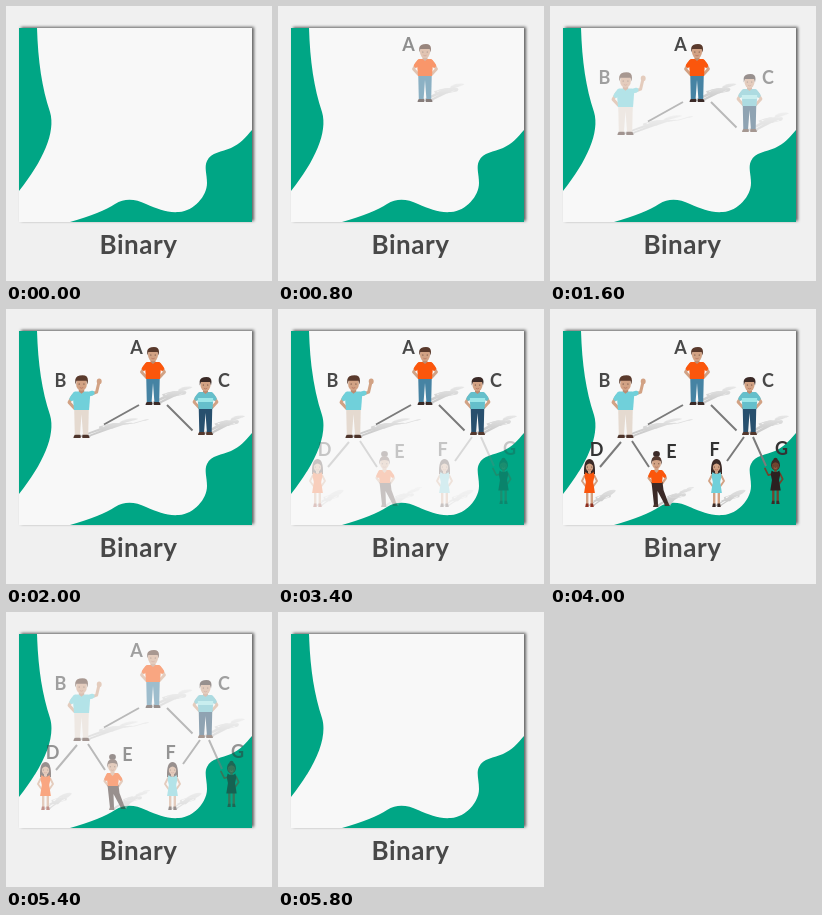
Animation, 266 px wide and 275 px high, one loop 6.4 s. Source, as an HTML page:

```html
<!DOCTYPE html>
<html lang="en">
<head>
<meta charset="utf-8">
<title>Binary tree</title>
<style>
html, body { margin: 0; width: 100%; height: 100%; overflow: hidden; background: #f0f0f0; }
svg { display: block; width: 266px; height: 275px; }
text { font-family: Lato, "Open Sans", sans-serif; font-weight: 700; fill: #484848; text-anchor: middle; }
</style>
</head>
<body>
<svg id="stage" viewBox="0 0 266 275"></svg>
<script>
const SKIN = '#d2a284', HAIR = '#5a3a2c', DARK = '#3b2a27', ORANGE = '#fb560c', CYAN = '#70d0da';

// A part is a filled shape, or a stroked line when it has a width.
const part = (color, d, width) => ({ color, d, width });

const draw = (p, color = p.color) => p.width
  ? `<path d="${p.d}" fill="none" stroke="${color}" stroke-width="${p.width}" stroke-linejoin="round" stroke-linecap="round"/>`
  : `<path d="${p.d}" fill="${color}"/>`;

const oval = (x, y, rx, ry) =>
  `M${x - rx} ${y}a${rx} ${ry} 0 1 0 ${2 * rx} 0a${rx} ${ry} 0 1 0 ${-2 * rx} 0Z`;

const eyes = y => part('#5b4037', `M-2.2 ${y}h.1M2.2 ${y}h.1`, 1.1);
const mouth = y => part('#b5705c', `M-1.3 ${y}Q0 ${y + 1} 1.3 ${y}`, .7);

function man({ shirt, pants, shoes, hair = HAIR, wave, stripe }) {
  const right = wave
    ? [part(SKIN, 'M7 -40L14 -42.5L16 -51', 2.8), part(SKIN, oval(16.4, -52.5, 2.3, 2.7)),
       part(shirt, 'M6 -40.5L10 -41.5', 4.4)]
    : [part(SKIN, 'M8 -39L11.5 -33L6.5 -27.5', 2.8), part(shirt, 'M6 -40.5L9 -36.5', 4.4)];
  return [
    part(SKIN, 'M-8 -39L-11.5 -33L-6.5 -27.5', 2.8),
    part(shirt, 'M-6 -40.5L-9 -36.5', 4.4),
    ...right,
    part(shoes, 'M-7.5 0Q-7 -4 -3.5 -4T-.8 0ZM7.5 0Q7 -4 3.5 -4T.8 0Z'),
    part(pants, 'M-6.8 -28H6.8L6.2 -3H1.4L0 -22L-1.4 -3H-6.2Z'),
    part(shirt, 'M-6 -43H6Q8 -42 8 -39L7 -26H-7L-8 -39Q-8 -42 -6 -43Z'),
    ...(stripe ? [part(stripe, 'M-7.7 -37H7.7L7.4 -33H-7.4Z')] : []),
    part('#bd8b70', 'M-2.5 -47H2.5V-43L0 -41L-2.5 -43Z'),
    part(SKIN, oval(0, -50, 5, 6.3)),
    part(hair, 'M-5.8 -49.5V-54Q-5 -58 1 -58Q6 -58 6 -53L5.5 -49.5L4.5 -53H-4.5Z'),
    eyes(-50), mouth(-46.5)
  ];
}

function woman({ dress, skin = SKIN, shoes = DARK, wave }) {
  const left = wave
    ? part(skin, 'M-4 -31L-7.5 -30L-11 -37', 1.8)
    : part(skin, 'M-4.5 -32L-7.5 -26L-4 -21', 1.9);
  const hair = wave
    ? [part(DARK, oval(0, -46, 2.2, 2.2)), part(DARK, oval(0, -40, 4.6, 5))]
    : [part(DARK, 'M-5.5 -33Q-6 -48 0 -48Q6 -48 5.5 -33Z')];
  return [
    ...hair, left,
    part(skin, 'M4.5 -32L7.5 -26L4 -21', 1.9),
    part(skin, 'M-2.3 -16V-3M2.3 -16V-3', 2.4),
    part(shoes, 'M-4.3 0L-3.6 -3.5H-1L-.8 0ZM4.3 0L3.6 -3.5H1L.8 0Z'),
    part(dress, 'M-4 -35L-2 -33.5H2L4 -35L5 -31L3.7 -25L5.4 -14H-5.4L-3.7 -25L-5 -31Z'),
    part(skin, 'M-1.5 -38H1.5V-34L0 -33L-1.5 -34Z'),
    part(skin, oval(0, -40, 3.7, 4.6)),
    part(DARK, 'M-4.4 -39Q-5 -46.5 0 -46.5Q5 -46.5 4.4 -39Q3.5 -43 0 -43.5Q-3.5 -43 -4.4 -39Z'),
    eyes(-40), mouth(-37.4)
  ];
}

const dancer = () => [
  part(DARK, oval(0, -53, 3.4, 3)),
  part(SKIN, 'M-5 -35L-8 -29L-4 -24', 2.2),
  part(SKIN, 'M6 -35L9.5 -29L6 -24', 2.2),
  part(ORANGE, 'M-4.5 -35L-6.5 -31M5 -35L8 -31', 3.6),
  part(DARK, 'M-5 -25H6L7 -17L12 -3.5L8.5 -2L1 -16L1.5 -2H-2.5Z'),
  part('#4a332c', 'M-3.5 0L-2.5 -3H1.5L2 0ZM8 -1L8.5 -3.5L11.5 -4.5L13.5 -1Z'),
  part(ORANGE, 'M-5 -37H5L6.5 -33L5.5 -24H-4.5L-6 -33Z'),
  part(SKIN, 'M-2 -41H2V-36L0 -34L-2 -36Z'),
  part(SKIN, oval(0, -43.5, 4.4, 5.3)),
  part('#553a30', 'M-5.3 -42Q-6 -51 0 -51Q6 -51 5.3 -42L4 -46Q0 -48 -4 -46Z'),
  eyes(-43.3), mouth(-40)
];

let shades = 0;
function person(x, y, size, parts, lean = 0, rise = .3) {
  let shadow = '';
  if (lean) {
    const id = 'shade' + shades++;
    shadow = `<linearGradient id="${id}" gradientUnits="userSpaceOnUse" x1="0" y1="-56" x2="0" y2="0">
      <stop stop-color="#e6e6e6"/><stop offset=".55" stop-color="#d3d3d3"/><stop offset="1" stop-color="#c6c6c6"/></linearGradient>
      <g transform="matrix(.9 0 ${-lean} ${rise} 1 -1)">${parts.map(p => draw(p, `url(#${id})`)).join('')}</g>`;
  }
  return `<g transform="translate(${x} ${y}) scale(${size})">${shadow}${parts.map(p => draw(p)).join('')}</g>`;
}

const label = (s, x, y, color = '#484848') =>
  `<text x="${x}" y="${y}" font-size="18" style="fill:${color}">${s}</text>`;
const links = d => `<path d="${d}" fill="none" stroke="#7b7b7b" stroke-width="2"/>`;

const top1 = label('A', 130.5, 45) +
  person(147, 96, 1, man({ shirt: ORANGE, pants: '#4683a3', shoes: DARK }), .6);

const row2 = links('M133 96L98 115.5M161 96L186.500 121.500') +
  label('B', 54.5, 78) + label('C', 218, 78) +
  person(75.5, 129, 1.08, man({ shirt: CYAN, pants: '#e5dad0', shoes: '#4e352c', wave: true }), .83) +
  person(199.500, 126, 1, man({ shirt: '#65bfcb', pants: '#28506e', shoes: '#54382d', hair: DARK, stripe: '#9be6e8' }), .6, .32);

const row3 = links('M71 133L50 158M82 132L99 158M194 128L177 152M203 128L216 157') +
  label('D', 46.5, 147, '#333') + label('E', 121.5, 149, '#333') +
  label('F', 164.5, 147, '#333') + label('G', 231.5, 146, '#333') +
  person(39.5, 198, 1, woman({ dress: ORANGE, shoes: '#8e2f20' }), .48, .34) +
  person(106.5, 198, 1, dancer(), .62, .34) +
  person(166.5, 198, 1, woman({ dress: CYAN }), .54, .34) +
  person(225.5, 195, .96, woman({ dress: '#2b2020', skin: '#70452f', wave: true }));

document.getElementById('stage').innerHTML = `
  <defs><filter id="drop" x="-10%" y="-10%" width="120%" height="120%">
    <feDropShadow dx="2" dy="-1" stdDeviation="1.4" flood-color="#000" flood-opacity=".6"/></filter></defs>
  <rect width="266" height="275" fill="#f0f0f0"/>
  <rect x="13" y="22" width="233" height="194" fill="#f8f8f8" filter="url(#drop)"/>
  <g fill="#00a685">
    <path d="M13 22H31C32 55 36 82 44 106C50 126 37 155 13 185Z"/>
    <path d="M64 216C85 210 100 204 109 198C119 192 129 193 140 198C152 203 161 207 173 206C188 205 201 190 201 177C201 168 198 161 201 155C205 146 216 146 225 142C234 138 240 131 246 124V216Z"/>
  </g>
  <g class="row">${row3}</g><g class="row">${row2}</g><g class="row">${top1}</g>
  <text x="132.500" y="248" font-size="26" letter-spacing=".5">Binary</text>`;

const [low, mid, high] = document.querySelectorAll('.row');
const LOOP = 6400, STEP = 200;
const clamp = v => Math.max(0, Math.min(1, v));

// Fades advance in even steps; the first step shows at `start`.
const fade = (t, start, steps) => clamp((Math.floor((t - start) / STEP) + 1) / steps);

function render(now) {
  const t = now % LOOP;
  const out = 1 - fade(t, 5200, 4);
  high.setAttribute('opacity', fade(t, 400, 5) * out);
  mid.setAttribute('opacity', fade(t, 1400, 4) * out);
  low.setAttribute('opacity', fade(t, 3400, 4) * out);
}

const begin = performance.now();
function tick() {
  render(performance.now() - begin);
  requestAnimationFrame(tick);
}
tick();
</script>
</body>
</html>
```
